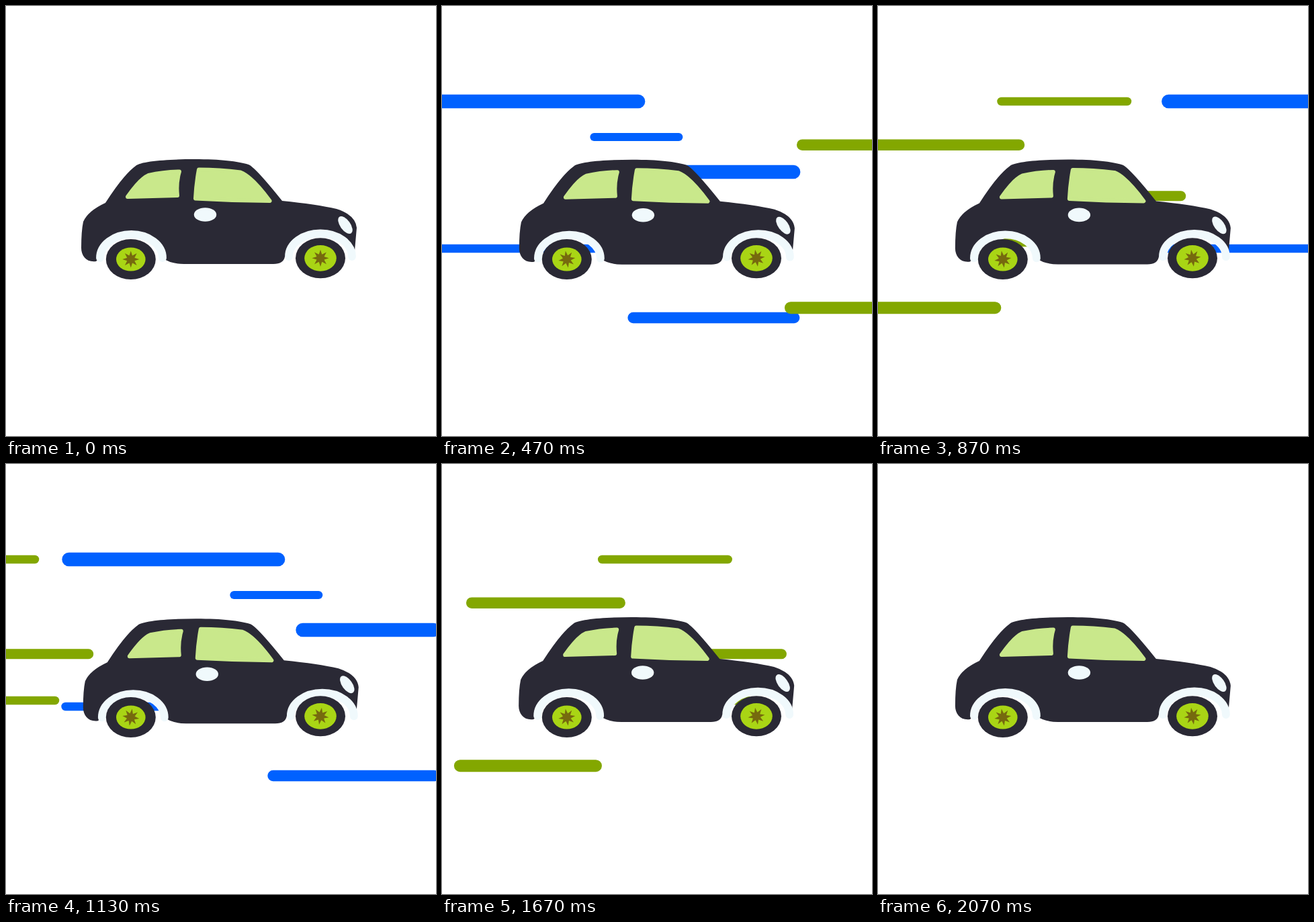
An HTML page that plays this animation: 640 px wide and 640 px high, repeating every 2130 ms.

```html
<!DOCTYPE html>
<html lang="en">
<head>
<meta charset="utf-8">
<title>Car</title>
<style>
html, body { margin: 0; height: 100%; overflow: hidden; background: #fff; }
svg { display: block; width: 100%; height: 100%; }
</style>
</head>
<body>
<svg viewBox="0 0 640 640">
  <g id="lines"></g>
  <g id="car" stroke-linecap="round" stroke-linejoin="round">
    <path fill="#2a2935" d="M134 380C120 382 112 372 112 360Q112 335 115 321Q122 305 148 293
      Q175 251 193 238C200 231 240 228 280 228S345 231 361 236Q371 240 411 290Q462 295 492 302
      Q520 311 522 330L519 364 515 373A47 34.500 0 0 0 421 373H415Q413 384 398 384H265
      Q245 384 233 375A46.500 35 0 0 0 140 375Z"/>
    <g fill="#c9e88b" stroke="#c9e88b" stroke-width="6">
      <path d="M181 284Q200 257 212 252Q234 247 258 246.500Q253 263 255 282Z"/>
      <path d="M282 286.500Q283 265 287 243.500Q318 243.500 349 247.500Q366 254 392.500 290Q336 289.500 282 286.500Z"/>
    </g>
    <g fill="#f0f9fc">
      <ellipse cx="296.500" cy="310.500" rx="16.700" ry="10.300"/>
      <ellipse cx="505" cy="326" rx="15" ry="7.500" transform="rotate(54 505 326)"/>
    </g>
    <g fill="none" stroke="#f0f9fc" stroke-width="11.800">
      <path d="M140 375A46.500 35 0 0 1 233 375"/>
      <path d="M421 373A47 34.500 0 0 1 515 373"/>
    </g>
  </g>
  <g id="wheels"></g>
</svg>
<script>
const LOOP = 2130, FRAMES = 53;
const $ = id => document.getElementById(id);

function add(parent, tag, attrs) {
  const el = document.createElementNS('http://www.w3.org/2000/svg', tag);
  for (const name in attrs) el.setAttribute(name, attrs[name]);
  return parent.appendChild(el);
}

// Two passes of a group of bars, the second one `gap` steps later
function addPasses(gap, speed, fill, bars) {
  return [0, gap].map(start => {
    const g = add($('lines'), 'g', { fill });
    for (const [x, y, width, height] of bars)
      add(g, 'rect', { x, y: y - height / 2, width, height, rx: height / 2 });
    return { g, start, speed };
  });
}

// Bar: left edge at the start of a pass, centre y, length, thickness
const passes = [
  ...addPasses(18, 56.47, '#0061ff', [
    [648, 142, 332, 20.5], [898, 195, 138, 12], [996, 247, 215, 20.5], [647, 361, 337, 12.5], [954, 464, 256, 16.5]
  ]),
  ...addPasses(21, 54.67, '#83a700', [
    [1380, 142, 200, 12.5], [1184, 206.7, 237, 16.5], [1495, 282.7, 166, 15], [1386, 352, 224, 12.5], [1166, 449.2, 220, 18]
  ])
];

const star = Array.from({ length: 16 }, (_, i) => {
  const r = i % 2 ? 6 : 12.6, a = i * Math.PI / 8;
  return [r * Math.sin(a), r * Math.cos(a)];
}).join(' ');

function addWheel(cx, cy, rx, ry) {
  const g = add($('wheels'), 'g', { transform: `translate(${cx} ${cy})` });
  add(g, 'ellipse', { rx: 37, ry: 30, fill: '#2a2935' });
  add(g, 'ellipse', { rx, ry, fill: '#a9d515' });
  return add(g, 'polygon', { points: star, fill: '#766a0e' });
}
const stars = [addWheel(185.8, 377, 21.8, 17.6), addWheel(468, 375.3, 23.8, 19.4)];

// 25 steps a second, snapped to a 30 Hz clock in whole hundredths
const stepStart = k => Math.round(Math.round(1.2 * k) * 10 / 3) * 10;

function draw(t) {
  let k = FRAMES - 1;
  while (stepStart(k) > t) k--;
  for (const { g, start, speed } of passes)
    g.setAttribute('transform', `translate(${-speed * (k - start)} 0)`);
  const sway = 2.9 * Math.min(1, 1.5 * Math.abs(Math.sin(Math.PI * k / 36)));
  const bounce = 1.65 * (1 - Math.cos(2 * Math.PI * 21 * k / 52));
  $('car').setAttribute('transform', `translate(${sway} ${bounce})`);
  for (const s of stars) s.setAttribute('transform', `rotate(${18 * k})`);
}

const begin = performance.now();
function tick() {
  draw((performance.now() - begin) % LOOP);
  requestAnimationFrame(tick);
}
tick();
</script>
</body>
</html>
```
